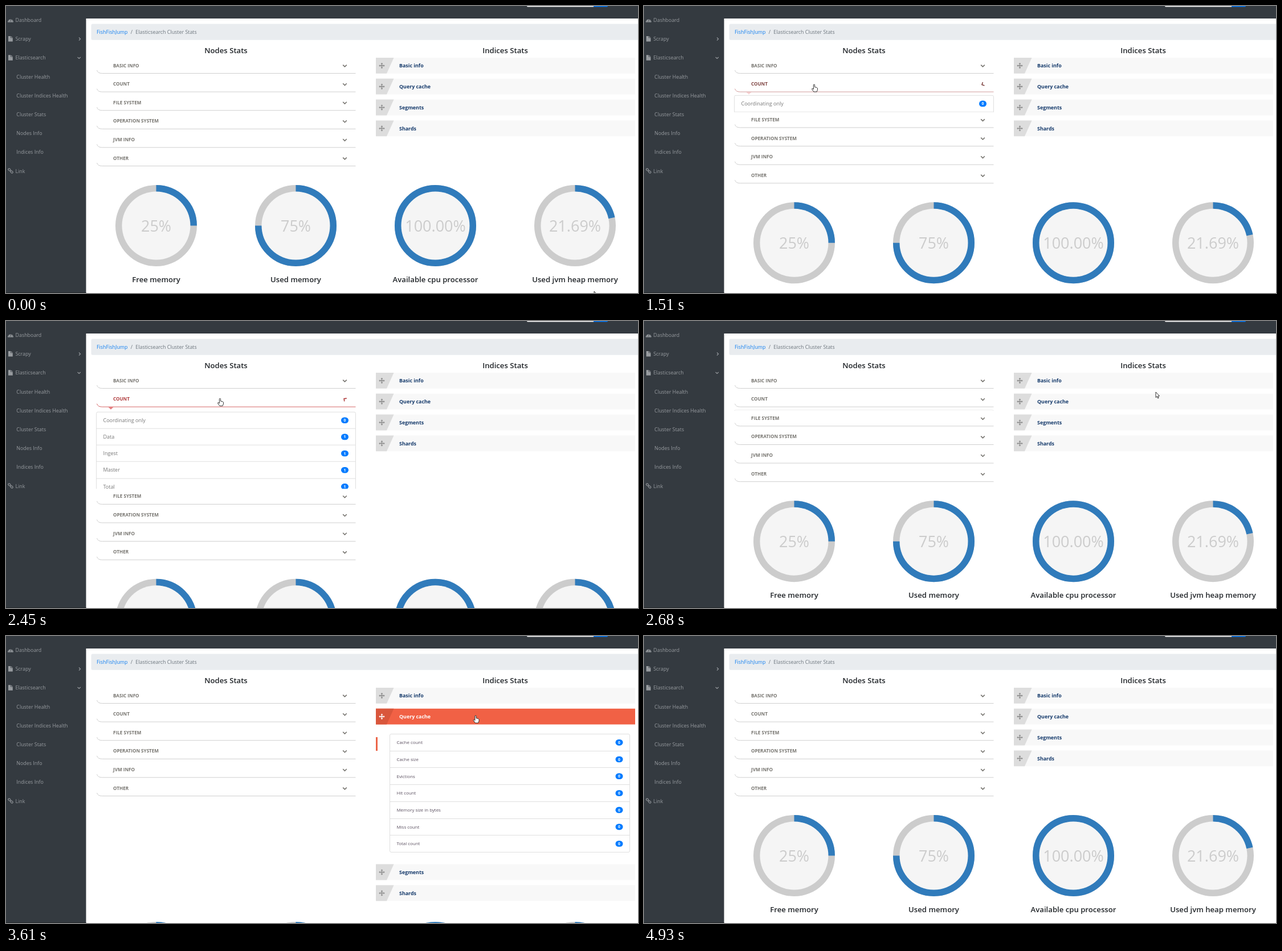
Write an HTML page that moves like this. It is 1109 px wide and 505 px high and loops after 5.63 s.

```html
<!DOCTYPE html>
<html lang="en">
<head>
<meta charset="utf-8">
<title>Cluster stats</title>
<style>
html, body { margin: 0; width: 100%; height: 100%; overflow: hidden; background: #fff; }
svg { display: block; width: 100vw; height: 100vh; font-family: "Open Sans", "Noto Sans", sans-serif; }
.side { font-size: 8.9px; fill: #979b9f; }
.icon { fill: #979b9f; }
.thin { fill: none; stroke: #979b9f; stroke-width: 1.1; }
.crumb { font-size: 8.9px; fill: #6c757d; }
.title { font-size: 13.15px; font-weight: 600; fill: #212529; text-anchor: middle; }
.head { font-size: 8.15px; font-weight: 700; }
.bar { font-size: 8.9px; font-weight: 700; }
.badge { font-size: 6.8px; font-weight: 700; fill: #fff; text-anchor: middle; }
.pct { text-anchor: middle; }
</style>
</head>
<body>
<svg id="stage" viewBox="0 0 1109 505" preserveAspectRatio="none"></svg>
<script>
const LOOP = 5630;
const stage = document.getElementById('stage');

function el(tag, attrs = {}, parent = stage, text) {
  const node = document.createElementNS('http://www.w3.org/2000/svg', tag);
  set(node, attrs);
  if (text !== undefined) node.textContent = text;
  parent.appendChild(node);
  return node;
}
function set(node, attrs) {
  for (const key in attrs) node.setAttribute(key, attrs[key]);
}
const rect = (x, y, width, height, fill, parent, more) =>
  el('rect', { x, y, width, height, fill, ...more }, parent);
const text = (x, y, str, cls, parent, more) =>
  el('text', { x, y, class: cls, ...more }, parent, str);
const path = (d, attrs, parent) => el('path', { d, ...attrs }, parent);
const move = (node, x, y) => node.setAttribute('transform', `translate(${x} ${y})`);

// Timing helpers
const clamp = v => Math.max(0, Math.min(1, v));
const swing = v => 0.5 - Math.cos(Math.PI * clamp(v)) / 2;
function ease(v) {
  v = clamp(v);
  let lo = 0, hi = 1, s = v;
  for (let i = 0; i < 20; i++) {
    s = (lo + hi) / 2;
    const x = 0.75 * s * (1 - s) + s * s * s;
    if (x < v) lo = s; else hi = s;
  }
  return v === 0 || v === 1 ? v : 0.3 * s * (1 - s) ** 2 + 3 * s * s * (1 - s) + s ** 3;
}
function mix(a, b, p) {
  const part = (c, i) => parseInt(c.slice(i, i + 2), 16);
  return `rgb(${[1, 3, 5].map(i => Math.round(part(a, i) + (part(b, i) - part(a, i)) * p))})`;
}
function track(keys, t) {
  let i = 0;
  while (i < keys.length - 2 && t >= keys[i + 1][0]) i++;
  const [a, b] = [keys[i], keys[i + 1]];
  const p = swing((t - a[0]) / (b[0] - a[0]));
  return a.slice(1).map((v, k) => v + (b[k + 1] - v) * p);
}

// The screen refreshes only at these moments: first, last, count
const bursts = [[70, 580, 8], [660, 740, 2], [970, 1270, 5], [1440, 1830, 6], [2380, 2910, 8],
  [3000, 3530, 8], [3610, 3610, 1], [4390, 4770, 6], [4930, 4930, 1]];
const ticks = [0];
for (const [from, to, n] of bursts)
  for (let i = 0; i < n; i++)
    ticks.push(Math.floor((from + (n > 1 ? (to - from) * i / (n - 1) : 0)) / 10) * 10);
const lastTick = t => ticks.filter(v => v <= t).pop();

// Shared widgets
const clips = {};
function clipped(id, x, y, width) {
  const clip = el('clipPath', { id });
  clips[id] = rect(x, y, width, 0, '#000', clip);
  return el('g', {}, el('g', { 'clip-path': `url(#${id})` }));
}
function list(parent, x, y, width, pitch, rows, values, size, color, badgeX) {
  const line = { fill: 'none', stroke: '#dfdfdf' };
  el('rect', { x, y, width, height: pitch * rows.length, rx: 2.5, ...line }, parent);
  rows.forEach((row, i) => {
    const mid = y + pitch * (i + 0.5);
    if (i) path(`M${x} ${Math.round(y + pitch * i - 0.5) + 0.5}h${width}`, line, parent);
    text(x + 12, mid + size * 0.36, row, '', parent, { 'font-size': size, fill: color });
    rect(badgeX - 6.5, mid - 5.3, 13, 10.6, '#007bff', parent, { rx: 5.3 });
    text(badgeX, mid + 2.5, values[i], 'badge', parent);
  });
}

// Circles
const pctSize = 27;
const circles = el('g');
const dials = [['25%', 25, 'Free memory'], ['75%', 75, 'Used memory'],
  ['100.00%', 100, 'Available cpu processor'], ['21.69%', 21.69, 'Used jvm heap memory']]
  .map(([label, value, name], i) => {
    const cx = 263.5 + 245 * i, cy = 386.5;
    el('circle', { cx, cy, r: 71.5, fill: '#ccc' }, circles);
    el('circle', { cx, cy, r: 65.5, fill: 'none', stroke: '#307bbb', 'stroke-width': 12, pathLength: 100,
      'stroke-dasharray': value < 100 ? `${value} 100` : 'none', transform: `rotate(-90 ${cx} ${cy})` }, circles);
    const inner = el('circle', { cx, cy, r: 60, fill: '#f5f5f5' }, circles);
    const num = text(cx, 397.2, label, 'pct', circles, { 'font-size': pctSize, fill: '#ccc' });
    text(cx, 485.8, name, 'title', circles);
    return { inner, num };
  });

// Left accordion
text(386, 83.4, 'Nodes Stats', 'title');
const LEFT_PITCH = 32.6;
const leftList = clipped('leftClip', 150, 156.5, 480);
list(leftList, 158.5, 156.5, 455, 29.15, ['Coordinating only', 'Data', 'Ingest', 'Master', 'Total'],
  [0, 1, 1, 1, 1], 9, '#777777', 594.5);
const heads = ['BASIC INFO', 'COUNT', 'FILE SYSTEM', 'OPERATION SYSTEM', 'JVM INFO', 'OTHER'].map((name, i) => {
  const g = el('g');
  const line = path('M159.5 113q1.5 5.5 9 5.5H613.5', { fill: 'none', stroke: '#cfcfcf' }, g);
  const label = text(188, 107.5, name, 'head', g);
  const chevron = path('M-3.3-1.6L0 1.7 3.3-1.6', { fill: 'none', 'stroke-width': 1.6 }, g);
  return { g, line, label, chevron, y: LEFT_PITCH * i };
});
const pointer = path('M179.5 151.5h9l-4.5 4.2z', { fill: '#d9383a' });

// Right accordion
text(876, 83.4, 'Indices Stats', 'title');
const RIGHT_PITCH = 36.8, PANEL = 237;
const panel = clipped('rightClip', 640, 156, 469);
rect(649, 178, 3, 24, '#ec6548', panel);
list(panel, 673.5, 172.5, 421, 29.7, ['Cache count', 'Cache size', 'Evictions', 'Hit count',
  'Memory size in bytes', 'Miss count', 'Total count'], Array(7).fill(0), 7.9, '#5b5060', 1076);
const bars = ['Basic info', 'Query cache', 'Segments', 'Shards'].map((name, i) => {
  const g = el('g');
  const back = rect(649, 91, 455, 27.8, '#f8f8f8', g);
  const block = path('M649 91h31.5l-12.5 27.8H649z', { fill: '#dddddd' }, g);
  const icon = el('g', { transform: 'translate(659.5 105)', fill: '#8a8a8a' }, g);
  for (let k = 0; k < 4; k++)
    path('M-.7 0V-3H-2L0-5.2 2-3H.7V0z', { transform: `rotate(${90 * k})` }, icon);
  const label = text(690, 108.3, name, 'bar', g, { fill: '#153a6b' });
  return { g, back, block, icon, label, y: RIGHT_PITCH * i };
});

// Frame: top bar, side menu, breadcrumb
rect(0, 0, 1109, 22, '#343a40');
rect(0, 0, 140.5, 505, '#343a40');
rect(0, 504, 140.5, 1, '#23272b');
path('M914 0H1031V1.6H916Q914 1.6 914 0z', { fill: '#fff' });
path('M1031 0H1056Q1056 1.6 1054 1.6H1031z', { fill: '#007bff' });
rect(149.5, 31.5, 965, 28.2, '#e9ecef', stage, { rx: 2.5 });
text(159, 49.3, 'FishFishJump', 'crumb', stage, { style: 'fill:#1480f0' });
text(218.8, 49.3, '/', 'crumb');
text(227.3, 49.3, 'Elasticsearch Cluster Stats', 'crumb');

[['Dashboard', 16.5], ['Scrapy', 16.5], ['Elasticsearch', 16.5], ['Cluster Health', 18.3],
  ['Cluster Indices Health', 18.3], ['Cluster Stats', 18.3], ['Nodes Info', 18.3], ['Indices Info', 18.3],
  ['Link', 16.5]].forEach(([name, x], i) => text(x, 28 + 33.2 * i, name, 'side'));
path('M3 28.5a5 5 0 1 1 10 0H3z', { class: 'icon' });
path('M7.8 27.5l1.3-4M4.6 26.4h1M5.6 23.4l.7.6M10.8 26.4h1', { fill: 'none', stroke: '#343a40', 'stroke-width': 0.9 });
for (const y of [53, 86.2]) {
  path(`M4 ${y}h4v3.2h3.8v6.3H4z`, { class: 'icon' });
  path(`M8.7 ${y}l3 2.6h-3z`, { class: 'icon' });
}
path('M128 55.5l2.6 2.5-2.6 2.5M125.6 90l2.6 2.5 2.6-2.5', { class: 'thin' });
for (const [x, y] of [[6, 288], [10, 292]])
  el('rect', { x: x - 2.4, y: y - 1.6, width: 4.8, height: 3.2, rx: 1.6, class: 'thin',
    transform: `rotate(45 ${x} ${y})` });

// Mouse cursor
const cursorPath = [[0, 1032, 502], [580, 293, 152], [660, 293, 145], [740, 292.5, 142], [970, 292.5, 142],
  [1110, 294, 153], [1270, 298.5, 138], [2380, 298.5, 138], [2680, 898, 125], [2910, 830, 142],
  [3000, 826, 141], [3530, 826, 141], [3610, 824, 140], [4390, 824, 140], [4540, 996, 475], [4620, 1020, 512], [LOOP, 1020, 512]];
const outline = { fill: '#fff', stroke: '#222', 'stroke-width': 0.9, 'stroke-linejoin': 'round' };
const cursors = {
  arrow: path('M0 0V9.6L2.2 7.6 3.7 11 5.2 10.4 3.8 7H6.6z', outline),
  hand: path('M-1.1 1Q-1.1 0 0 0T1.1 1V4.7Q5.8 5 6 6.8V9.6L4.6 13H-.6L-3.8 8.6Q-4 6.8-2.6 7.2L-1.1 8.6z', outline),
  beam: path('M-2-5H2M0-5V5M-2 5H2', { fill: 'none', stroke: '#333', 'stroke-width': 0.9 })
};

function slot(y, top, pitch, height, count) {
  const i = Math.floor((y - top) / pitch);
  return i >= 0 && i < count && y - top - i * pitch <= height ? i : -1;
}

function render(t) {
  const [x, y] = track(cursorPath, t);
  const overLeft = x > 159 && x < 613 ? slot(y, 91.5, LEFT_PITCH, 27.5, 6) : -1;
  const overRight = x > 649 && x < 1104 ? slot(y, 91, RIGHT_PITCH, 27.8, 4) : -1;
  const onCaption = x > 922 && x < 1076 && y > 470 && y < 494;
  const kind = overLeft >= 0 || overRight >= 0 ? 'hand' : onCaption ? 'beam' : 'arrow';
  for (const k in cursors) cursors[k].style.display = k === kind ? '' : 'none';
  move(cursors[kind], x, y);

  // Left list slides open and shut
  const leftOpen = swing((t - 1421) / 300) - swing((t - 2397) / 300);
  const leftShift = 150 * leftOpen;
  const red = ease((t - 1421) / 400) - ease((t - 2390) / 300);
  set(clips.leftClip, { height: leftShift });
  move(leftList, 0, 4 * leftOpen);
  heads.forEach((h, i) => {
    const on = i === 1 ? red : 0;
    const color = mix(i === overLeft ? '#4f4a47' : '#777570', '#d9383a', on);
    move(h.g, 0, h.y + (i > 1 ? leftShift : 0));
    h.line.style.stroke = mix('#cfcfcf', '#d9383a', on);
    h.label.style.fill = h.chevron.style.stroke = color;
    set(h.chevron, { transform: `translate(594.5 105.2) rotate(${180 * on})` });
  });
  pointer.style.opacity = clamp(red * 1.2 - 0.2);

  // Right panel
  const rightShift = PANEL * (ease((t - 2995) / 340) - ease((t - 4385) / 340));
  const [lit, unlit] = [ease((t - 2990) / 500), ease((t - 4385) / 500)];
  const glow = lit - unlit, late = lit ** 2 - unlit ** 2;
  set(clips.rightClip, { height: rightShift });
  bars.forEach((b, i) => move(b.g, 0, b.y + (i > 1 ? rightShift : 0)));
  const query = bars[1];
  query.back.style.fill = mix('#f8f8f8', '#f16145', glow);
  query.block.style.fill = mix('#dddddd', '#d9563c', glow);
  query.icon.style.fill = mix('#8a8a8a', '#ffffff', glow);
  query.label.style.fill = mix('#153a6b', '#ffffff', late);

  // Circles sit below the taller column
  move(circles, 0, Math.max(leftShift, rightShift - 49));
  const [hover] = track([[4440, 0], [4540, 0.24], [4640, 0]], t);
  const size = pctSize * (1 + hover / 2);
  set(dials[3].inner, { r: 60 + 5.7 * hover });
  set(dials[3].num, { 'font-size': size, y: 387.5 + size * 0.357, fill: mix('#cccccc', '#307bbb', hover) });
}

const start = performance.now();
function loop() {
  render(lastTick((performance.now() - start) % LOOP));
  requestAnimationFrame(loop);
}
loop();
</script>
</body>
</html>
```
